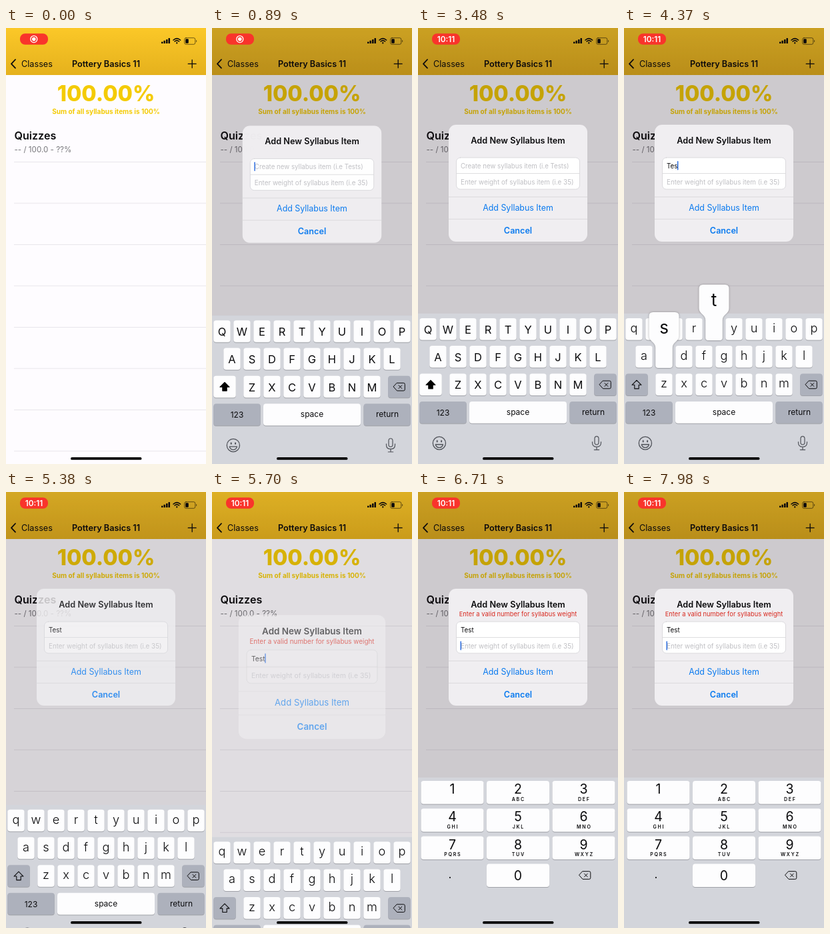
Animation of 300x649 px, one loop 8000 ms. Source, as an HTML page with a canvas:

```html
<!DOCTYPE html>
<html lang="en">
<head>
<meta charset="utf-8">
<style>
  html, body { margin: 0; width: 100%; height: 100%; overflow: hidden; background: #fff; }
  canvas { display: block; width: 100vw; height: 100vh; }
</style>
</head>
<body>
<canvas></canvas>
<script>
const W = 300, H = 649, LOOP = 8000;
const KEYBOARD_TOP = 425, KEYBOARD_HEIGHT = 224;
const OPEN = 545, CLOSE = 5338, REOPEN = 5590, SECOND_FIELD = 6400;
const BLUE = '#0a7aef', INK = '#0b0b0d', GOLD = '#f4cb04';

// Key presses: letter, finger down, finger up, moment the letter is entered
const PRESSES = [
  ['T', 3680, 3800, 3800],
  ['e', 3980, 4100, 4100],
  ['s', 4220, 4390, 4340],
  ['t', 4340, 4460, 4460]
];
const LETTER_ROWS = [['qwertyuiop', 15], ['asdfghjkl', 30], ['zxcvbnm', 60]];
const ROW_TOPS = [432, 473, 514.5, 556];
const KEY_H = 32.5;

const canvas = document.querySelector('canvas');
const ctx = canvas.getContext('2d');

// Critically damped settle from 0 to 1
function settle(ms) {
  const x = Math.max(0, ms) * 0.018;
  return 1 - (1 + x) * Math.exp(-x);
}

// y is the middle of the capital letters
function text(str, x, y, size, weight = 400, color = INK, align = 'center') {
  ctx.font = `${weight} ${size}px Inter, sans-serif`;
  ctx.textAlign = align;
  ctx.fillStyle = color;
  ctx.fillText(str, x, y + size * 0.364);
}

function box(x, y, w, h, r, color) {
  ctx.beginPath();
  ctx.roundRect(x, y, w, h, r);
  ctx.fillStyle = color;
  ctx.fill();
}

function stroke(path, width = 1, color = INK) {
  ctx.lineWidth = width;
  ctx.strokeStyle = color;
  ctx.lineCap = ctx.lineJoin = 'round';
  ctx.stroke(new Path2D(path));
}

function line(x, y, w, color) {
  ctx.fillStyle = color;
  ctx.fillRect(x, y, w, 0.8);
}

function drawPage() {
  ctx.fillStyle = '#fefcff';
  ctx.fillRect(0, 0, W, H);
  const gold = ctx.createLinearGradient(0, 0, 0, 70);
  gold.addColorStop(0, '#fbc828');
  gold.addColorStop(1, '#e5b11d');
  ctx.fillStyle = gold;
  ctx.fillRect(0, 0, W, 70);

  // Signal, wifi, battery
  for (let i = 0; i < 4; i++) box(233 + i * 3.5, 20.5 - i * 1.8, 2.5, 2.5 + i * 1.8, 0.6, INK);
  stroke('M251 18Q256.3 13.2 261.6 18M253 20Q256.3 17.2 259.6 20', 1.6);
  stroke('M256.3 22.2v.2', 2.2);
  box(269.2, 16.2, 4.6, 6.6, 1.3, INK);
  stroke('M270 14.7h11.5q2.3 0 2.3 2.3v5q0 2.3-2.3 2.3h-11.5q-2.3 0-2.3-2.3v-5q0-2.3 2.3-2.3zM285.6 18.4v2.2', 0.9, '#0009');

  stroke('M14 47l-6 6.3 6 6.3', 1.8);
  stroke('M273.2 53.3h12M279.2 47.3v12', 1.3);
  text('Classes', 23, 53.3, 12.7, 400, INK, 'left');
  text('Pottery Basics 11', 150, 53.3, 12.7, 600);

  text('100.00%', 150, 97, 32.4, 800, GOLD);
  text('Sum of all syllabus items is 100%', 150, 124, 10, 700, GOLD);
  text('Quizzes', 12.5, 160, 16.1, 600, INK, 'left');
  text('-- / 100.0 - ??%', 12.5, 180.5, 11.6, 400, '#77777b', 'left');
  for (let i = 0; i < 8; i++) line(12, 199 + i * 61.5, 288, '#e3e2e6');
}

function cursorOn(t) {
  const start = t >= SECOND_FIELD ? SECOND_FIELD : t >= REOPEN ? REOPEN : t >= 3680 ? 4460 : OPEN;
  return t < start || (t - start) % 1000 < 650;
}

function drawFields(shown) {
  ctx.globalAlpha = shown ** 5;
  box(57.5, 193, 185, 47, 6, '#fff');
  ctx.globalAlpha = shown;
  ctx.lineWidth = 0.7;
  ctx.strokeStyle = '#cfcfd3';
  ctx.stroke();
  line(57.5, 216.2, 185, '#d6d6d9');
}

function drawAlert(t, shown) {
  const entering = t < CLOSE || t >= REOPEN;
  const hidden = 1 - shown;
  const typed = PRESSES.filter(p => t >= p[3]).map(p => p[0]).join('');
  ctx.save();
  ctx.globalAlpha = shown;
  if (entering) {
    const scale = 1 + hidden * 0.15;
    ctx.translate(150, 231 + hidden * KEYBOARD_HEIGHT / 2);
    ctx.scale(scale, scale);
    ctx.translate(-150, -231);
  }
  box(46, 144, 208, 174, 11, '#f0eef1');
  text('Add New Syllabus Item', 150, 167, 12.7, 600);
  if (t >= REOPEN) text('Enter a valid number for syllabus weight', 150, 181.5, 9.35, 400, '#d8291f');

  drawFields(shown);
  const hint = '#bfbfc3';
  if (typed) text(typed, 64, 205, 9.8, 400, INK, 'left');
  else text('Create new syllabus item (i.e Tests)', 64, 205, 9.7, 400, hint, 'left');
  const typedWidth = typed ? ctx.measureText(typed).width : 0;
  text('Enter weight of syllabus item (i.e 35)', 64, 229, 9.85, 400, hint, 'left');
  if (entering && cursorOn(t)) {
    const second = t >= SECOND_FIELD;
    box(second ? 63.5 : 63.5 + typedWidth, second ? 222 : 198, 1.5, 13.5, 0.7, '#2f6fe0');
  }

  line(46, 251, 208, '#d7d6d9');
  line(46, 284, 208, '#d7d6d9');
  text('Add Syllabus Item', 150, 267, 12.4, 400, BLUE);
  text('Cancel', 150, 301, 12.6, 600, BLUE);
  ctx.restore();
}

function key(x, y, w, h, color = '#fdfdfe') {
  box(x, y + 1, w, h, 4, '#a0a2a8');
  box(x, y, w, h, 4, color);
}

function deleteIcon(x, y) {
  ctx.save();
  ctx.translate(x, y);
  stroke('M-3.5-5.8h9.8q2 0 2 2v7.6q0 2-2 2h-9.8l-5.2-5.8zM-1-2.4l4.8 4.8M3.8-2.4l-4.8 4.8', 1);
  ctx.restore();
}

function drawPopup(letter) {
  const row = LETTER_ROWS.findIndex(r => r[0].includes(letter.toLowerCase()));
  const [letters, firstX] = LETTER_ROWS[row];
  const x = firstX + letters.indexOf(letter.toLowerCase()) * 30;
  ctx.save();
  ctx.translate(x, ROW_TOPS[row]);
  ctx.shadowColor = '#0005';
  ctx.shadowBlur = 3;
  ctx.fillStyle = '#fdfdfe';
  ctx.fill(new Path2D('M-16.5-50h33q6 0 6 6v29c0 9-9.8 9-9.8 18v26q0 4-4 4h-17.4q-4 0-4-4v-26c0-9-9.8-9-9.8-18v-29q0-6 6-6z'));
  ctx.restore();
  text(letter, x, ROW_TOPS[row] - 27.5, 26);
}

function drawLetterKeys(t) {
  const upper = t < PRESSES[0][3];
  const grey = '#adb1bc';
  LETTER_ROWS.forEach(([letters, firstX], row) => {
    [...letters].forEach((letter, i) => {
      const x = firstX + i * 30, y = ROW_TOPS[row];
      key(x - 12.7, y, 25.4, KEY_H);
      if (upper) text(letter.toUpperCase(), x, y + 16.8, 16.5);
      else text(letter, x, y + 14.2, 18.2, 300);
    });
  });

  key(2.3, ROW_TOPS[2], 33.5, KEY_H, upper ? '#fdfdfe' : grey);
  const arrow = 'M19 524.3l7 7h-3.8v5.6h-6.4v-5.6h-3.8z';
  stroke(arrow, 1.1);
  if (upper) {
    ctx.fillStyle = '#000';
    ctx.fill(new Path2D(arrow));
  }
  key(264.2, ROW_TOPS[2], 33.5, KEY_H, grey);
  deleteIcon(281, 531);

  key(2.3, ROW_TOPS[3], 70.5, KEY_H, grey);
  key(77, ROW_TOPS[3], 146, KEY_H);
  key(227.5, ROW_TOPS[3], 70.2, KEY_H, grey);
  text('123', 37.5, 572.5, 12);
  text('space', 150, 571.5, 12);
  text('return', 263, 571.5, 12);

  const icon = '#50535a';
  stroke('M22.3 618a9.6 9.6 0 1 0 19.2 0a9.6 9.6 0 1 0-19.2 0M26.3 620h11.2q-1 4.6-5.6 4.6t-5.6-4.6z', 1.3, icon);
  stroke('M28.7 614.6v1.2M35.1 614.6v1.2', 2, icon);
  stroke('M265 611q0-3.2 3-3.2t3 3.2v6q0 3.2-3 3.2t-3-3.2zM261.5 616v1.5q0 6 6.5 6t6.5-6v-1.5M268 623.5v4M264.3 627.8h7.4', 1.2, icon);

  for (const [letter, down, up] of PRESSES) if (t >= down && t < up) drawPopup(letter);
}

function drawNumberKeys() {
  const groups = ['', 'ABC', 'DEF', 'GHI', 'JKL', 'MNO', 'PQRS', 'TUV', 'WXYZ'];
  const column = i => 51.5 + i * 98.5;
  groups.forEach((group, i) => {
    const x = column(i % 3), y = 430 + Math.floor(i / 3) * 41.2;
    key(x - 47, y, 94, 34.5);
    text(i + 1, x, y + 12.2, 19.5);
    ctx.letterSpacing = '1.7px';
    text(group, x + 0.8, y + 27.3, 7.1, 600);
    ctx.letterSpacing = '0px';
  });
  key(103, 553.6, 94, 34.5);
  text('0', 150, 571, 19.5);
  text('.', 48, 569, 17);
  deleteIcon(250.5, 570.5);
}

function drawKeyboard(t, shown) {
  ctx.save();
  ctx.translate(0, (1 - shown) * KEYBOARD_HEIGHT);
  ctx.fillStyle = '#d3d5db';
  ctx.fillRect(0, KEYBOARD_TOP, W, KEYBOARD_HEIGHT);
  if (t < SECOND_FIELD) drawLetterKeys(t);
  else drawNumberKeys();
  ctx.restore();
}

function drawSystemMarks(t) {
  box(21, 8.3, 42, 16.5, 7.5, '#f9342b');
  const clock = Math.min(1, Math.max(0, (t - 1650) / 250));
  ctx.globalAlpha = 1 - clock;
  ctx.beginPath();
  ctx.arc(41.8, 16.6, 5, 0, 7);
  ctx.lineWidth = 1.3;
  ctx.strokeStyle = '#fff';
  ctx.stroke();
  box(39, 13.8, 5.6, 5.6, 2.8, '#fff');
  ctx.globalAlpha = clock;
  text('10:11', 42, 16.7, 11.8, 600, '#fff');
  ctx.globalAlpha = 1;
  box(97, 639, 106.5, 3.8, 1.9, '#000');
}

function draw(t) {
  const width = Math.round(innerWidth * devicePixelRatio);
  const height = Math.round(innerHeight * devicePixelRatio);
  if (canvas.width !== width || canvas.height !== height) {
    canvas.width = width;
    canvas.height = height;
  }
  ctx.setTransform(width / W, 0, 0, height / H, 0, 0);

  const shown = settle(t - OPEN) - settle(t - CLOSE) + settle(t - REOPEN);
  drawPage();
  if (shown > 0) {
    ctx.fillStyle = `rgba(12, 0, 14, ${0.2 * shown})`;
    ctx.fillRect(0, 0, W, H);
    drawAlert(t, shown);
    drawKeyboard(t, shown);
  }
  drawSystemMarks(t);
}

const start = performance.now();
function tick() {
  draw((performance.now() - start) % LOOP);
  requestAnimationFrame(tick);
}
tick();
</script>
</body>
</html>
```
